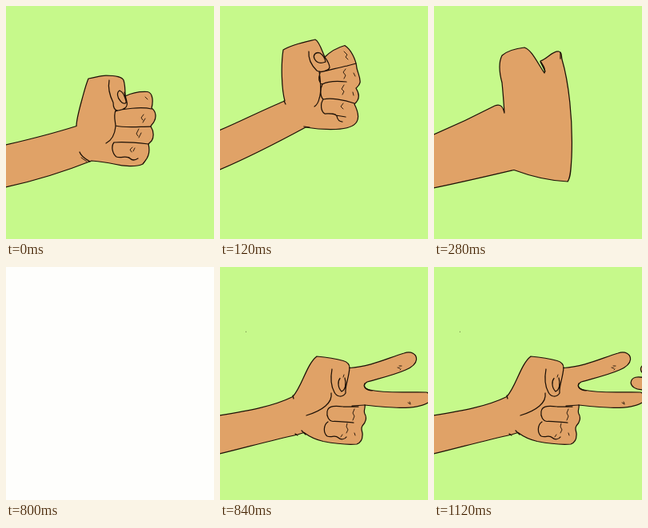
Recreate the animation shown at these times as an HTML page. Size 260x292 px, loop 1160 ms.

```html
<!DOCTYPE html>
<html lang="en">
<head>
<meta charset="utf-8">
<title>Rock, scissors</title>
<style>
html, body { margin: 0; width: 100%; height: 100%; overflow: hidden; background: #c6f98b; }
svg { display: block; width: 260px; height: 292px; }
g { visibility: hidden; }
path { fill: none; stroke: #1c1006; stroke-width: 1.25; stroke-linecap: round; stroke-linejoin: round; }
.skin { fill: #e0a267; }
.thin { stroke-width: .9; }
.faint { stroke-width: .9; stroke-opacity: .5; }
</style>
</head>
<body>
<svg viewBox="0 0 260 292">
  <g id="rock">
    <path class="skin" d="M-20 179 L0 174 C30 167 58 160 88 150.500 C88 142 92 128 95 117 C98 106 100 98 103 91
      C112 90 117 87 125 87 C136 87 145 88 147 93 C149 99 149 106 149 113 C157 109 168 107 177 107.500
      C184 109 184 120 182 128 C188 132 188 140 185 145 C183 149 181 149 181 151 C185 157 185 165 182 169
      L178 173 C180 181 179 188 174 194 L171 198 C163 202 147 201 135 198 C125 196 117 195 107 194
      C72 208 36 219 0 227 L-20 232 Z"/>
    <path d="M129 93 C127 104 130 113 134 121 C134 127 136 131 140 131 C147 130 153 127 151 120 L148 108
      M142 106 C138 108 139 115 143 119 C146 123 151 123 150 119 C148 113 147 108 142 106
      M137 132 C145 129 169 126 182 129 M137 131 C134 138 137 145 137 151 C136 161 133 168 125 172
      M137 150 C149 153 167 151 181 151 M135 171 C146 170 161 171 178 173
      M135 171 C131 176 133 185 138 189 C144 191 151 187 155 191 C158 194 162 193 165 191 M92 183 C94 189 100 192 105 195"/>
    <path class="thin" d="M94 190 L101 195 M172 136 L169 140 L171 143 M174 141 L171 146 M166 154 L163 160 L165 163
      M169 159 L166 165 M158 177 L155 180 L157 183 M161 178 L159 182 M174 114 L177 117 M171 198 L173 195"/>
  </g>

  <g id="raised">
    <path class="skin" d="M-30 169 L0 155.500 C27 144 54 130 81 119 C77 104 76 74 79 55 C90 48 106 45 119 42
      C124 44 127 55 131 64 C138 57 147 52 156 49.500 C163 54 170 66 171 78 C173 86 176 91 175 96
      C174 100 172 101 170 103 C175 111 174 118 168 123 C172 131 174 140 171 145 C167 152 156 154 145 154.500
      C132 155 119 154 107 152 C72 171 35 190 0 205 L-30 218 Z"/>
    <path d="M80 119 L82 123 M105 151 L112 152 M111 57 C110 67 115 75 121 81 C126 84 136 81 137 77 C137 72 134 68 131 64
      M125 59 C119 57 116 62 118 66 C121 72 127 72 132 70 C131 65 128 61 125 59
      M124 83 C136 81 148 77 159 75 M124 82 C126 96 127 108 124 116 C123 121 121 124 118 126
      M125 84 C123 90 123 96 128 98 C135 94 148 94 158 95 M128 98 C125 104 125 113 129 117 C138 115 154 117 168 122
      M129 117 C125 123 126 132 131 135 C137 135 144 134 146 138 C147 143 150 145 153 145 M159 75 L170 72 M145 137 L157 139"/>
    <path class="thin" d="M155 57 L159 61 L157 64 L160 67 M157 79 L154 83 L157 87 L155 91 M155 99 L152 104 L155 107 L153 111
      M154 122 L151 126 L154 129 M167 84 L169 88 M166 108 L167 112"/>
  </g>

  <g id="paper">
    <path class="skin" d="M-20 170 L0 161 C28 149 53 137 76 125 C83 122 86 126 88 134 C87 119 86 106 85 96
      C82 85 80 72 85 62 C92 56 104 53 113 52 C122 55 128 69 138 84 C140 79 136 74 133 69
      C142 66 148 56 156 57 C160 58 159 62 160 67 C168 94 174 141 172 190 C171 204 171 215 167 220
      C144 219 120 213 100 205.500 C68 213 34 221 0 228 L-20 232 Z"/>
    <path d="M133 70 L139 82 M158 58 L158 66"/>
  </g>

  <g id="scissors">
    <path class="skin" d="M-20 190 L0 186 C33 180.500 66 175 91 162.500 C103 149 108 122 121 112 C132 113 145 115 154 117.500
      C159 119 162 121 162 126.500 C188 125 210 114 230 108 C239 105 246 109 245.500 116 C245 122 239 126 232 129
      C216 136 197 140 184 144 C177 148 181 153 187 154 C210 159 238 156 258 157 C263 158 264 167 260 170
      C244 180 208 176 181 173 C182 177 179 180 181 184 C184 189 182 195 178 199 C175 203 179 207 178 211
      C178 216 176 220 171 222 C158 223 142 221 129 218.500 C118 216 111 212 105 207.500 L97 210 C65 217 33 226 0 234 L-20 239 Z"/>
    <path d="M140 128 C138 139 139 150 143 157 C146 163 153 164 157 158 C156 149 161 140 162 126
      M150 139.500 C147 143 147 151 152 156 C157 154 158 146 156 139
      M139 158 C141 170 128 180 108 186 M134 181 C135 173 146 174 154 175 L173 175
      M134 181 C133 187 136 193 141 193.500 C149 193 159 195 167 195 M165 174 L181 173
      M135 194 C129 198 129 208 134 212 C140 214 144 210 148 214 C151 217 156 216 158 213
      M91 161 L92 165 M94 209 L97 211 M102 205 L107 210"/>
    <path d="M181 146 C179 151 183 154 190 155" stroke-width="2"/>
    <path class="thin" d="M155 135 L154 138 M168 178 L166 183 L168 187 L166 192 M159 196 L158 200 L160 204 L158 208
      M153 210 L151 213 M168 208 L169 211 M222 126 L225 127 M224 124 L227 124 M225 129 L226 128 M235 170 L238 172 M237 169 L238 171"/>
    <path class="faint" d="M32.500 81 L32.500 81.500"/>
  </g>

  <g id="visitor">
    <path class="skin" d="M264 139 C255 137 247 137 246 145 C247 152 255 154 264 154 Z"/>
    <path class="skin" d="M264 122 C257 124 256 131 264 135 Z"/>
  </g>

  <g id="flash"><rect width="260" height="292" fill="#fefefc"/></g>
</svg>
<script>
const LOOP = 1160;
const layers = [...document.querySelectorAll("g")];
const raised = document.getElementById("raised");

function visibleAt(t) {
  if (t < 40) return ["rock"];
  if (t < 280) return ["raised"];
  if (t < 320) return ["paper"];
  if (t >= 1120) return ["scissors", "visitor"];
  // White strobe, every other 40 ms
  const lit = t >= 800 && Math.floor((t - 800) / 40) % 2 === 0;
  return [lit ? "flash" : "scissors"];
}

function draw(now) {
  const t = now % LOOP;
  const shown = visibleAt(t);
  for (const layer of layers) layer.style.visibility = shown.includes(layer.id) ? "visible" : "hidden";
  // The fist is halfway up before it settles
  raised.setAttribute("transform", t < 120 ? "translate(0 9) rotate(5 0 180)" : "");
}

const start = performance.now();
function tick() {
  draw(performance.now() - start);
  requestAnimationFrame(tick);
}
tick();
</script>
</body>
</html>
```
